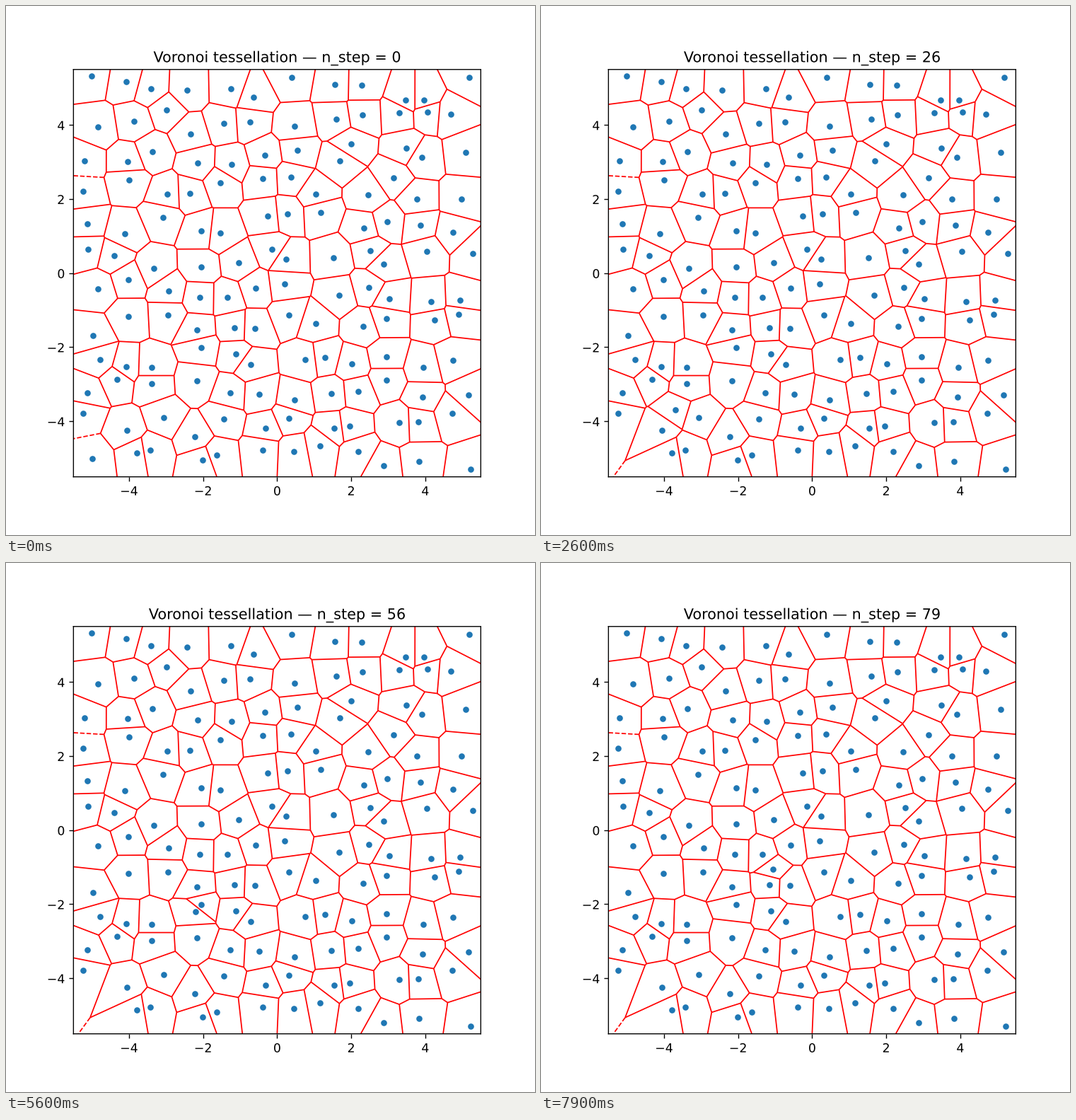
These frames come from a looping animation (748x748 px, 8000 ms). A matplotlib script:

```python
import numpy as np
import matplotlib.pyplot as plt
from matplotlib.animation import FuncAnimation
from matplotlib.collections import LineCollection
from matplotlib.patheffects import Normal
from matplotlib.tri import Triangulation

SIZE, FRAMES, INTERVAL = 748, 80, 100
SIDE, JITTER = 12, 1 / 3        # sites per side, largest offset from the lattice
LIM, STEP = 5.5, 0.05

plt.rcParams["path.snap"] = False


def jittered_lattice():
    rng = np.random.default_rng(1)
    axis = np.linspace(-5, 5, SIDE)
    x, y = np.meshgrid(axis, axis, indexing="ij")
    lattice = np.column_stack([x.ravel(), y.ravel()])
    return lattice + JITTER * (2 * rng.random(lattice.shape) - 1)


def circumcenters(a, b, c):
    u, v = b - a, c - a
    d = 2 * (u[:, 0] * v[:, 1] - u[:, 1] * v[:, 0])
    uu, vv = (u ** 2).sum(1), (v ** 2).sum(1)
    x = (v[:, 1] * uu - u[:, 1] * vv) / d
    y = (u[:, 0] * vv - v[:, 0] * uu) / d
    return a + np.column_stack([x, y])


def voronoi_ridges(pts):
    """Return the bounded ridges and the open rays of the Voronoi diagram."""
    tri = Triangulation(pts[:, 0], pts[:, 1])
    corners = tri.triangles
    centers = circumcenters(*(pts[corners[:, k]] for k in range(3)))
    reach = np.ptp(pts, axis=0).max()
    ridges, rays = [], []
    for t, near in enumerate(tri.neighbors):
        for k, other in enumerate(near):
            if other > t:
                ridges.append([centers[t], centers[other]])
            elif other < 0:
                dx, dy = pts[corners[t, (k + 1) % 3]] - pts[corners[t, k]]
                out = np.array([dy, -dx]) / np.hypot(dx, dy)
                rays.append([centers[t], centers[t] + out * reach])
    return ridges, rays


sites = jittered_lattice()

fig, ax = plt.subplots(figsize=(6, 6), dpi=SIZE / 6)
solid = ax.add_collection(LineCollection([], colors="red", linewidths=1), autolim=False)
dashed = ax.add_collection(
    LineCollection([], colors="red", linewidths=1, linestyles="dashed"), autolim=False)
dots = ax.scatter(sites[:, 0], sites[:, 1], s=25, color="C0", linewidths=0, zorder=2)

ticks = range(-4, 5, 2)
ax.set(xlim=(-LIM, LIM), ylim=(-LIM, LIM), aspect="equal", xticks=ticks, yticks=ticks)
# Draw text as outlines so that it sits at exact subpixel positions.
plt.setp([ax.title, *ax.get_xticklabels(), *ax.get_yticklabels()],
         path_effects=[Normal()])


def update(step):
    pts = sites.copy()
    pts[0] = -5 + STEP * step   # one site travels along the diagonal
    ridges, rays = voronoi_ridges(pts)
    solid.set_segments(ridges)
    dashed.set_segments(rays)
    dots.set_offsets(pts)
    ax.set_title(f"Voronoi tessellation — n_step = {step}")
    return solid, dashed, dots


anim = FuncAnimation(fig, update, frames=FRAMES, interval=INTERVAL,
                     repeat=True, repeat_delay=0)
plt.show()
```
